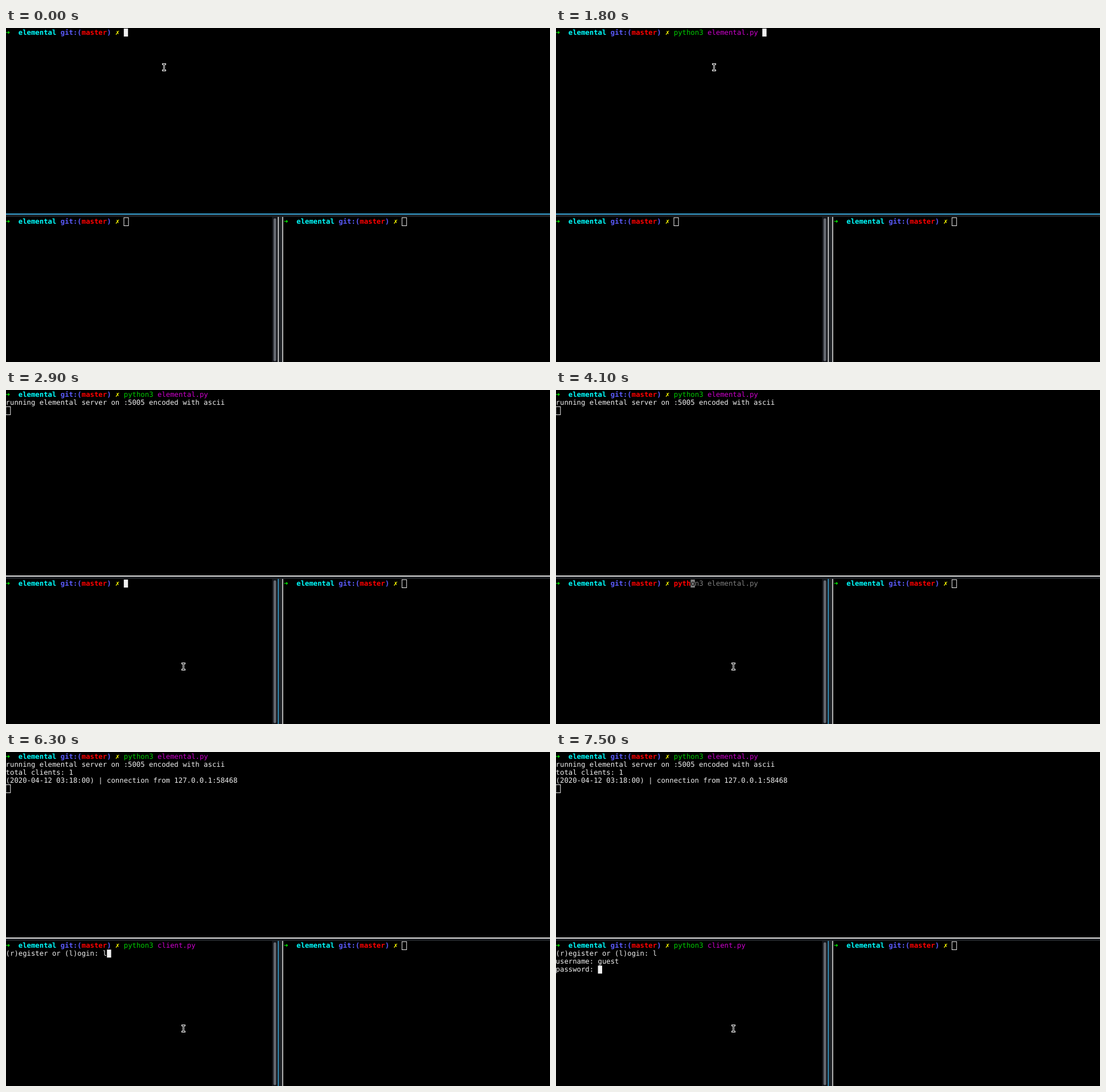
Write an HTML page that moves like this. It is 955x587 px and loops after 8000 ms.

```html
<!DOCTYPE html>
<html lang="en">
<head>
<meta charset="utf-8">
<title>Terminal session</title>
<style>
  html, body { margin: 0; width: 100%; height: 100%; overflow: hidden; background: #000; }
  svg { display: block; width: 100%; height: 100%; }
  text {
    font: 12.29px "DejaVu Sans Mono", monospace;
    white-space: pre;
    text-rendering: geometricPrecision;
  }
  .b { font-weight: bold; }
</style>
</head>
<body>
<svg id="stage" viewBox="0 0 955 587"></svg>
<script>
const LOOP = 8000, CELL = 7.4, LINE = 14.08;
const WHITE = '#f0f0f0', GREY = '#7f7f7f', GREEN = '#00cd00', MAGENTA = '#cd00cd';
const RED = '#ff0000', BLUE = '#5c5cff', FOCUS = '#35a0d2', IDLE = '#dedede';
const stage = document.getElementById('stage');

const SERVER = 'python3 elemental.py', CLIENT = 'python3 client.py', USER = 'guest';

// [time, characters typed]
const serverKeys = [[300, 1], [500, 2], [700, 3], [800, 5], [1000, 6], [1100, 7],
  [1300, 8], [1400, 9], [1500, 10], [1600, 11], [1800, 20]];
const clientKeys = [[3700, 1], [3900, 2], [4000, 3], [4100, 4], [4200, 5], [4300, 6],
  [4400, 7], [4600, 8], [4900, 9], [5000, 10], [5100, 17]];
const userKeys = [[6700, 1], [6900, 2], [7000, 3], [7200, 4], [7300, 5]];

const at = (keys, t, start) => keys.reduce((v, [time, next]) => t >= time ? next : v, start);

const rect = (x, y, w, h, fill, extra = '') =>
  `<rect x="${x}" y="${y}" width="${w}" height="${h}" fill="${fill}" ${extra}/>`;

function pane(x, y) {
  const px = col => x + col * CELL, py = row => y + row * LINE;
  const put = (col, row, str, fill = WHITE, bold = false) => str
    ? `<text x="${px(col)}" y="${py(row) + 11}" fill="${fill}"${bold ? ' class="b"' : ''}>${str}</text>`
    : '';
  const cursor = (col, row, focused, under = '') => focused
    ? rect(px(col), py(row), CELL, 14, under ? GREY : WHITE) + put(col, row, under, '#000')
    : rect(px(col) + 0.2, py(row) + 0.1, CELL + 0.6, 14.2, 'none', `stroke="${WHITE}" stroke-width="1"`);
  const prompt = () =>
    put(0, 0, '➜', '#00ff00', true) +
    put(3, 0, 'elemental', '#00ffff', true) +
    put(13, 0, 'git:(', BLUE, true) +
    put(18, 0, 'master', RED, true) +
    put(24, 0, ')', BLUE, true) +
    put(26, 0, '✗', '#ffff00', true);

  // Shell line with syntax colours and a grey suggestion after the typed part
  function command(line, n, editing) {
    const known = n >= 6, full = n === line.length;
    const ghost = n ? line.slice(n) : '';
    return put(28, 0, line.slice(0, Math.min(n, 7)), known ? GREEN : RED, !known) +
      put(36, 0, line.slice(8, Math.max(n, 8)), full ? MAGENTA : WHITE) +
      put(28 + n, 0, ghost, GREY) +
      (editing ? cursor(28 + n + (full ? 1 : 0), 0, true, ghost[0] === ' ' ? '' : ghost[0]) : '');
  }
  return { put, cursor, prompt, command };
}

const top_ = pane(-0.4, 1), left = pane(-0.4, 333.2), right = pane(487.8, 333.2);

function serverPane(t, focused) {
  let out = top_.prompt() + top_.command(SERVER, at(serverKeys, t, 0), t < 2000);
  if (t < 2000) return out;
  out += top_.put(0, 1, 'running elemental server on :5005 encoded with ascii');
  if (t < 5400) return out + top_.cursor(0, 2, focused);
  return out + top_.put(0, 2, 'total clients: 1') +
    top_.put(0, 3, '(2020-04-12 03:18:00) | connection from 127.0.0.1:58468') +
    top_.cursor(0, 4, focused);
}

function clientPane(t, focused) {
  const n = at(clientKeys, t, 0);
  let out = left.prompt() + left.command(n < 9 ? SERVER : CLIENT, n, focused && t < 5400);
  if (!focused) return out + left.cursor(28, 0, false);
  if (t < 5400) return out;
  const choice = t >= 6300 ? 'l' : '';
  out += left.put(0, 1, '(r)egister or (l)ogin: ' + choice);
  if (t < 6400) return out + left.cursor(23 + choice.length, 1, true);
  const name = USER.slice(0, at(userKeys, t, 0));
  out += left.put(0, 2, 'username: ' + name);
  if (t < 7500) return out + left.cursor(10 + name.length, 2, true);
  return out + left.put(0, 3, 'password: ') + left.cursor(10, 3, true);
}

function frames(topFocused) {
  return rect(0, 326, 955, 6, '#1d2024') +
    rect(0, 326, 955, 2, topFocused ? FOCUS : IDLE) +
    rect(467, 332, 10, 255, '#14161b') +
    rect(469.7, 334.5, 4.6, 251, '#646870', 'rx="2.3"') +
    rect(477, 332, 9, 255, '#1d2024') +
    rect(477.2, 332, 1.6, 255, topFocused ? IDLE : FOCUS) +
    rect(484.9, 332, 1.6, 255, IDLE);
}

function pointer(t) {
  const k = at([[2600, 0.25], [2700, 0.7], [2800, 1]], t, 0);
  const beam = 'M-2 -5.5H2M0 -5.5V5.5M-2 5.5H2';
  return `<g transform="translate(${277.5 + 34 * k} ${69 + 417 * k})" fill="none" stroke-linecap="square">` +
    `<path d="${beam}" stroke="#fff" stroke-width="2.8"/><path d="${beam}" stroke="#000" stroke-width="1"/></g>`;
}

function draw(t) {
  const topFocused = t < 2900;
  return rect(0, 0, 955, 587, '#000') + frames(topFocused) +
    serverPane(t, topFocused) + clientPane(t, !topFocused) +
    right.prompt() + right.cursor(28, 0, false) + pointer(t);
}

let shown = '';
const start = performance.now();
function tick() {
  const next = draw((performance.now() - start) % LOOP);
  if (next !== shown) stage.innerHTML = shown = next;
  requestAnimationFrame(tick);
}
tick();
</script>
</body>
</html>
```
